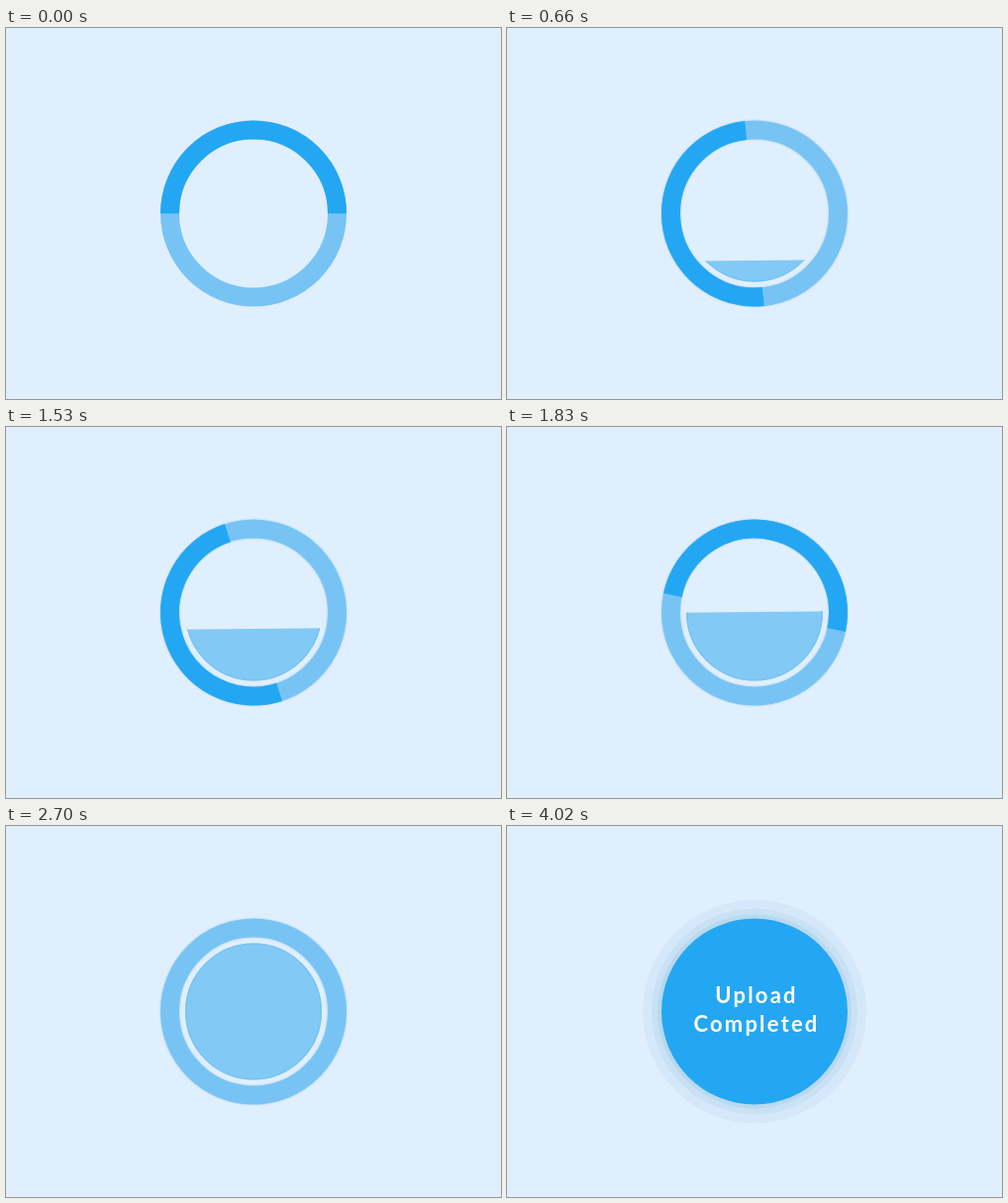
An HTML page with a canvas for the animation above (4.53 s loop, 500x375 px).

```html
<!DOCTYPE html>
<html lang="en">
<head>
<meta charset="utf-8">
<title>Upload progress</title>
<style>
  html, body { margin: 0; width: 100%; height: 100%; overflow: hidden; background: #e0effd; }
  canvas { display: block; }
</style>
</head>
<body>
<canvas id="stage" width="500" height="375"></canvas>
<script>
const ctx = document.getElementById('stage').getContext('2d');
const LOOP = 4530, STEP = 30, FULL = 2700, FADE = 570;
const CX = 250, CY = 187.5;
const BG = '#e0effd', DARK = '#24a7f2', LIGHT = '#77c4f4', WATER = '#82c9f5';

// [time in ms, height of the water surface]
const levels = [[0, 257], [660, 235], [1050, 217.6], [1530, 204], [2160, 168.2], [FULL, 117]];

function levelAt(t) {
  if (t >= FULL) return 117;
  const i = levels.findIndex(([time]) => time > t);
  const [t0, y0] = levels[i - 1], [t1, y1] = levels[i];
  return y0 + (y1 - y0) * (t - t0) / (t1 - t0);
}

function disc(r, color) {
  ctx.beginPath();
  ctx.arc(CX, CY, r, 0, 2 * Math.PI);
  ctx.fillStyle = color;
  ctx.fill();
}

function ring(r, width, color, from = 0, to = 2 * Math.PI) {
  ctx.beginPath();
  ctx.arc(CX, CY, r, from, to);
  ctx.lineWidth = width;
  ctx.strokeStyle = color;
  ctx.stroke();
}

function drawWater(t) {
  const y = levelAt(t);
  ctx.save();
  ctx.beginPath();
  ctx.moveTo(CX - 80, y + 0.7);
  ctx.lineTo(CX + 80, y - 0.7);
  ctx.lineTo(CX + 80, 270);
  ctx.lineTo(CX - 80, 270);
  ctx.clip();
  disc(69, WATER);
  ring(68.3, 1.4, '#79c3f2');
  ctx.restore();
}

function drawLoader(t) {
  if (t > 0) {
    ring(84.5, 21.5, '#cde4f7');
    drawWater(t);
  }
  ring(84.5, 19, LIGHT);
  if (t < FULL) {
    const turn = t / 900 * 2 * Math.PI;
    ring(84.5, 19, DARK, turn + Math.PI, turn + 2 * Math.PI);
  }
}

function drawDone(opacity) {
  ctx.globalAlpha = opacity;
  disc(113, '#d5e8f9');
  disc(104, '#c9e1f5');
  disc(98, '#b9d9ef');
  disc(94, DARK);
  ctx.fillStyle = '#fff';
  ctx.font = 'bold 22px Lato, sans-serif';
  ctx.letterSpacing = '2.2px';
  ctx.textAlign = 'center';
  ctx.fillText('Upload', 252, 179);
  ctx.fillText('Completed', 252, 208);
  ctx.globalAlpha = 1;
}

function draw(t) {
  ctx.fillStyle = BG;
  ctx.fillRect(0, 0, 500, 375);
  const p = Math.min(Math.max((t - FULL) / FADE, 0), 1);
  if (p < 1) drawLoader(t);
  if (p > 0) drawDone(p * (2 - p));
}

const start = performance.now();
function tick() {
  const t = (performance.now() - start) % LOOP;
  draw(Math.floor(t / STEP) * STEP);
  requestAnimationFrame(tick);
}
tick();
</script>
</body>
</html>
```
